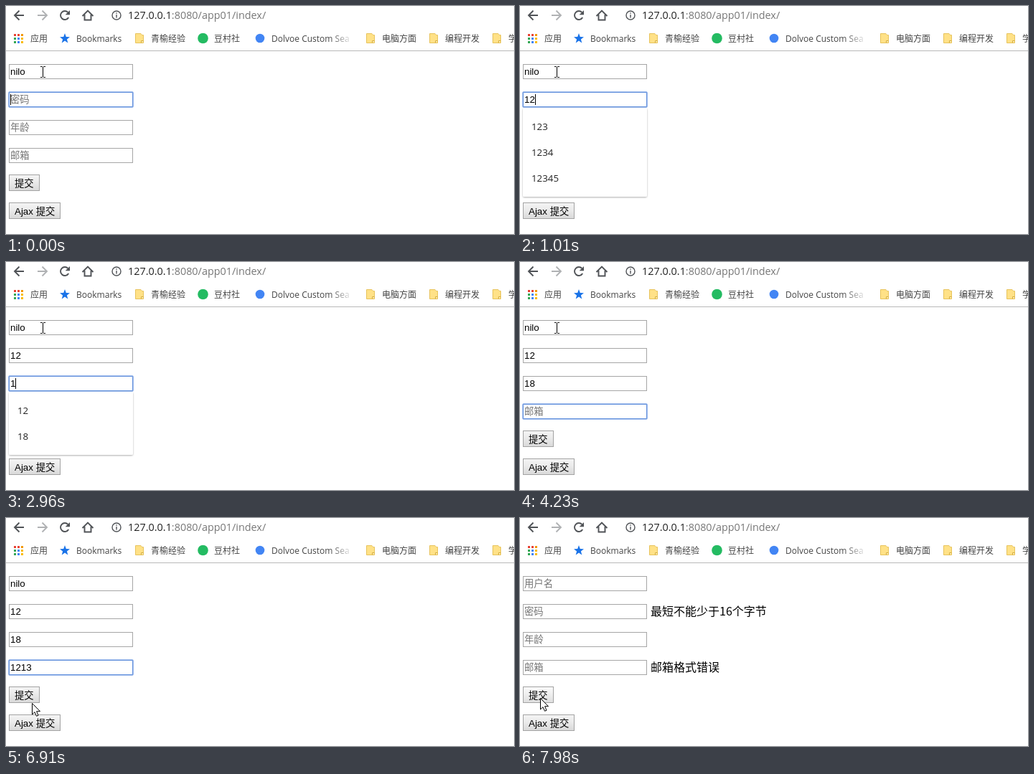
An HTML page that plays this animation: 708 px wide and 318 px high, repeating every 8000 ms.

```html
<!DOCTYPE html>
<html lang="zh-CN">
<head>
<meta charset="utf-8">
<style>
html, body { margin: 0; width: 100%; height: 100%; overflow: hidden; background: #fff; }
svg { display: block; width: 708px; height: 318px; }
.bar { font: 12px "Open Sans", "Noto Sans CJK SC", sans-serif; fill: #444; }
.url { font: 14.4px "Open Sans", sans-serif; fill: #222; }
.form { font: 13.333px "Liberation Sans", "Noto Sans CJK SC", sans-serif; }
.list { font: 13.3px "Open Sans", sans-serif; fill: #222; }
.error { font: 16px "Noto Sans CJK SC", sans-serif; }
.icon { fill: none; stroke: #505357; stroke-width: 1.9; }
.dim { stroke: #b0b2b4; }
</style>
</head>
<body>
<svg viewBox="0 0 708 318">
  <defs>
    <linearGradient id="fade"><stop stop-color="#fff" stop-opacity="0"/><stop offset="1" stop-color="#fff"/></linearGradient>
    <linearGradient id="normal" x2="0" y2="1"><stop stop-color="#f4f4f4"/><stop offset=".4" stop-color="#ececec"/><stop offset="1" stop-color="#d9d9d9"/></linearGradient>
    <linearGradient id="hover" x2="0" y2="1"><stop stop-color="#fafafa"/><stop offset=".4" stop-color="#f1f1f1"/><stop offset="1" stop-color="#dedede"/></linearGradient>
    <linearGradient id="pressed" x2="0" y2="1"><stop stop-color="#d2d2d2"/><stop offset="1" stop-color="#e6e6e6"/></linearGradient>
    <filter id="shadow" x="-5%" y="-5%" width="110%" height="110%"><feDropShadow dx="0" dy="1" stdDeviation="1" flood-opacity=".32"/></filter>
  </defs>
  <g class="icon">
    <path d="M25 13H12.5M18.5 6.5L12 13L18.5 19.5"/>
    <path class="dim" d="M44 13H56.5M50.5 6.5L57 13L50.5 19.5"/>
    <path d="M106.5 14L114 6.5L121.5 14M109.5 12V19.5H118.5V12"/>
    <g stroke-width="1.4"><circle cx="154" cy="13" r="6"/><path d="M154 12V16.5M154 9.2V10.7"/></g>
  </g>
  <text class="url" x="170" y="18">127.0.0.1<tspan fill="#777">:8080/app01/index/</tspan></text>
  <g class="bar" id="bookmarks"></g>
  <path d="M0 62.5H708" stroke="#b8b8b8"/>
  <g id="page"></g>
</svg>
<script>
const $ = id => document.getElementById(id);
const text = (x, y, s, more = '') => `<text x="${x}" y="${y}" ${more}>${s}</text>`;
const rect = (x, y, w, h, more) => `<rect x="${x}" y="${y}" width="${w}" height="${h}" ${more}/>`;

// Bookmarks bar
const dots = ['#ea4335', '#ea4335', '#f29900', '#34a853', '#4285f4', '#fbbc04', '#34a853', '#4285f4', '#fbbc04'];
const folder = x => `<path d="M${x + .5} 38.5H${x + 8}L${x + 9.5} 40.5H${x + 11.5}V51.5H${x + .5}Z" fill="#ffe187" stroke="#e7c35c"/>
  <path d="M${x + 8.5} 51.5V48.5H${x + 11.5}" fill="#fff3c9" stroke="#d5ac3c"/>`;
const star = Array.from({ length: 10 }, (_, i) => {
  const r = i % 2 ? 3.1 : 7.4, a = i * Math.PI / 5;
  return [82 + r * Math.sin(a), 45.5 - r * Math.cos(a)].map(v => v.toFixed(1));
}).join(' ');
$('bookmarks').innerHTML =
  dots.map((c, i) => rect(11 + i % 3 * 5, 39 + (i / 3 | 0) * 5, 3, 3, `fill="${c}"`)).join('') +
  `<polygon points="${star}" fill="#1a73e8"/>
   <circle cx="274.5" cy="45" r="7.3" fill="#24bb62"/><circle cx="354" cy="45" r="6.3" fill="#4285f4"/>` +
  [180, 502, 590, 678].map(folder).join('') +
  [[34, '应用'], [98, 'Bookmarks'], [202, '青榆经验'], [290, '豆村社'], [370, 'Dolvoe Custom Sea'],
   [524, '电脑方面'], [612, '编程开发'], [700, '学']].map(([x, s]) => text(x, 50, s)).join('') +
  rect(452, 36, 32, 20, 'fill="url(#fade)"') + rect(484, 36, 14, 20, 'fill="#fff"');

// Each step changes part of the state
const ones = n => '1'.repeat(n);
const user = 'nilo';
const steps = [
  [0, { values: [user, '', '', ''], focus: 1, caret: 1, list: [], width: 174, mouse: null, button: 'normal', loading: 0, errors: 0 }],
  [430, { caret: 0 }],
  [710, { values: [user, '1', '', ''], caret: 1, list: ['123', ones(20), ones(17), ones(22), ones(30)], width: 288 }],
  [1010, { values: [user, '12', '', ''], list: ['123', '1234', '12345'], width: 173 }],
  [1570, { caret: 0 }],
  [1840, { focus: 2, caret: 1, list: [] }],
  [2430, { caret: 0 }],
  [2960, { values: [user, '12', '1', ''], caret: 1, list: ['12', '18'] }],
  [3390, { values: [user, '12', '18', ''], list: ['18'] }],
  [3670, { focus: 3, list: [] }],
  [4230, { caret: 0 }],
  [4630, { values: [user, '12', '18', '1'], caret: 1, list: [ones(17)], width: 192 }],
  [5190, { values: [user, '12', '18', '12'], list: [] }],
  [5650, { values: [user, '12', '18', '121'] }],
  [6030, { values: [user, '12', '18', '1213'] }],
  [6650, { caret: 0, mouse: [1, 190] }],
  [6770, { mouse: [12, 247], button: 'hover' }],
  [6910, { mouse: [36, 258], button: 'normal' }],
  [7040, { caret: 1, mouse: [31, 252], button: 'hover' }],
  [7190, { mouse: [29, 252] }],
  [7310, { mouse: [28, 251] }],
  [7460, { focus: -1, caret: 0, button: 'pressed' }],
  [7580, { button: 'focused', loading: 1 }],
  [7980, { values: ['', '', '', ''], button: 'hover', loading: 0, errors: 1 }]
];
const hints = ['用户名', '密码', '年龄', '邮箱'];
const fieldTop = i => 81 + 39 * i;

function drawField(s, i) {
  const y = fieldTop(i), v = s.values[i], on = s.focus === i;
  return rect(4.5, y + .5, 172, 20, `fill="#fff" stroke="${on ? '#6391dc' : '#a6a6a6'}"`) +
    (on ? rect(3.5, y - .5, 174, 22, 'rx="1.5" fill="none" stroke="#a5c0ee"') : '') +
    text(6, y + 15, v || hints[i], v ? '' : 'fill="#757575"') +
    (on && s.caret ? rect(Math.round(6 + 7.414 * v.length), y + 3, 1, 15, 'fill="#000"') : '');
}

function drawButton(y, w, label, look) {
  const focused = look === 'focused';
  return rect(4.5, y + .5, w - 1, 22, `fill="url(#${focused ? 'hover' : look})" stroke="${focused ? '#6391dc' : '#a3a3a3'}"`) +
    text(12, y + 17, label);
}

function drawList(s) {
  if (!s.list.length) return '';
  const y = fieldTop(s.focus) + 22;
  return rect(4, y, s.width, 16 + 36 * s.list.length, 'rx="2" fill="#fff" filter="url(#shadow)"') +
    `<g class="list">${s.list.map((v, i) => text(16, y + 31 + 36 * i, v)).join('')}</g>`;
}

function drawPointer(p) {
  return p
    ? `<path transform="translate(${p})" d="M.5 .5V16L4 12.7L6.5 18.3L9 17.2L6.6 11.7H11.5Z" fill="#fff" stroke="#000"/>`
    : '<path d="M48 84.5H50.5L51.5 85.5L52.5 84.5H55M51.5 85V99M48 99.5H50.5L51.5 98.5L52.5 99.5H55" fill="none" stroke="#000"/>';
}

function draw(s) {
  const reload = s.loading ? 'M76.5 7.5L87.5 18.5M87.5 7.5L76.5 18.5' : 'M87.2 16A6 6 0 1 1 86.4 8.9';
  return `<path class="icon" d="${reload}"/>` +
    (s.loading ? '' : '<path d="M89 6V12.3H82.7Z" fill="#505357"/>') +
    `<g class="form">${hints.map((_, i) => drawField(s, i)).join('')}
     ${drawButton(235, 43, '提交', s.button)}${drawButton(274, 72, 'Ajax 提交', 'normal')}</g>` +
    (s.errors ? `<g class="error">${text(182, 136, '最短不能少于16个字节')}${text(182, 214, '邮箱格式错误')}</g>` : '') +
    drawList(s) + drawPointer(s.mouse);
}

let shown = -1;
function tick(now) {
  const t = now % 8000;
  const past = steps.filter(([at]) => at <= t);
  if (past.length !== shown) {
    shown = past.length;
    $('page').innerHTML = draw(Object.assign({}, ...past.map(p => p[1])));
  }
  requestAnimationFrame(tick);
}
tick(0);
</script>
</body>
</html>
```
